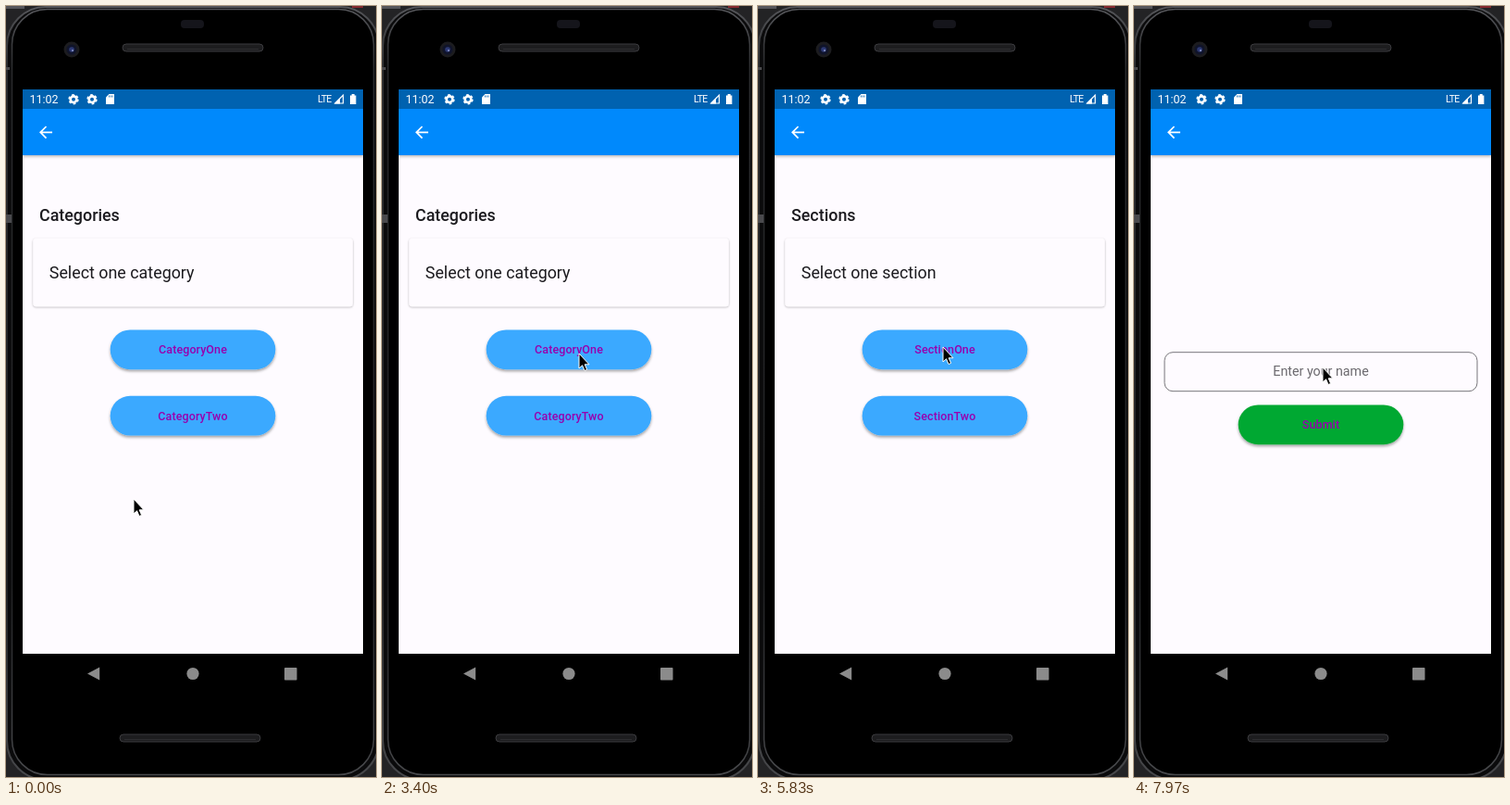
An HTML page for the animation above (8000 ms loop, 400 px wide and 832 px high).

```html
<!DOCTYPE html>
<html lang="en">
<head>
<meta charset="utf-8">
<style>
  html, body { margin: 0; width: 100%; height: 100%; overflow: hidden; background: #050505; }
  svg { display: block; width: 400px; height: 832px; font-family: Roboto, sans-serif; }
  .title { font-size: 17.86px; font-weight: 500; fill: #1c1b1f; }
  .body { font-size: 17.86px; fill: #1c1b1f; }
  .label { font-size: 12.5px; font-weight: 500; letter-spacing: .09px; fill: #9800ae; text-anchor: middle; }
  .hint { font-size: 14.29px; fill: #6b696e; text-anchor: middle; }
</style>
</head>
<body>
<svg viewBox="0 0 400 832">
  <defs>
    <linearGradient id="bezel" x1="0" y1="0" x2="0" y2="1">
      <stop offset="0" stop-color="#55565a"/>
      <stop offset=".08" stop-color="#292a2c"/>
      <stop offset=".75" stop-color="#202123"/>
      <stop offset="1" stop-color="#48494c"/>
    </linearGradient>
    <filter id="barShadow" x="-5%" y="-20%" width="110%" height="150%">
      <feDropShadow dx="0" dy="1.5" stdDeviation="1.5" flood-opacity=".28"/>
    </filter>
    <filter id="buttonShadow" x="-10%" y="-20%" width="120%" height="160%">
      <feDropShadow dx="0" dy="2" stdDeviation="1.8" flood-opacity=".36"/>
    </filter>
    <filter id="cardShadow" x="-5%" y="-10%" width="110%" height="125%">
      <feDropShadow dx="0" dy=".8" stdDeviation=".8" flood-opacity=".3"/>
    </filter>
    <clipPath id="screen"><rect x="18" y="90" width="368" height="609"/></clipPath>
    <g id="gear" fill="none" stroke="#fff">
      <circle r="3.3" stroke-width="2.6"/>
      <circle r="4.8" stroke-width="1.8" stroke-dasharray="2.6 2.427"/>
    </g>
    <g id="speaker">
      <rect width="152" height="8" rx="4" fill="#1d1d1f" stroke="#3b3b3e"/>
      <path d="M5 5.5H147" stroke="#2d2d30"/>
    </g>
  </defs>

  <!-- phone body -->
  <rect width="400" height="832" fill="#232325"/>
  <path d="M0 0H20V3H0Z" fill="#55555a"/>
  <path d="M374 0H386V2H374Z" fill="#85292f"/>
  <rect x="1" y="1" width="402" height="834" rx="42" fill="#0b0b0c" stroke="url(#bezel)" stroke-width="2"/>
  <rect x="6.5" y="3.5" width="391" height="826" rx="38" fill="#000" stroke="url(#bezel)" stroke-width="1.5"/>
  <path d="M0 66H4V69H0ZM0 225H6V234H0Z" fill="#4a4a4d"/>
  <rect x="189" y="15" width="25" height="9" rx="4" fill="#15151b"/>
  <use href="#speaker" x="126" y="41"/>
  <use href="#speaker" x="123" y="786"/>
  <circle cx="71" cy="47" r="8.5" fill="#1c1c1f"/>
  <circle cx="71" cy="47" r="5.5" fill="#10142a"/>
  <circle cx="71" cy="47" r="2.8" fill="#2d3973"/>
  <circle cx="72" cy="48" r="1" fill="#8d98cc"/>

  <g clip-path="url(#screen)">
    <rect x="18" y="90" width="368" height="609" fill="#fefbff"/>
    <rect x="18" y="111" width="368" height="50" fill="#0089fc" filter="url(#barShadow)"/>
    <rect x="18" y="90" width="368" height="21" fill="#0062b0"/>
    <g id="page"></g>
  </g>

  <!-- status and app bar icons -->
  <g fill="#fff">
    <text x="25.5" y="105.3" font-size="12.5">11:02</text>
    <use href="#gear" x="73" y="100.7"/>
    <use href="#gear" x="93" y="100.7"/>
    <path d="M111.5 95H117V106H108V98.5Z"/>
    <path d="M111.5 96.5V98.5M113.3 96.5V98.5M115.1 96.5V98.5" stroke="#0062b0" stroke-width=".8"/>
    <text x="337" y="104" font-size="10.5" letter-spacing="-.6">LTE</text>
    <path d="M355.8 105H364.5V96.3Z" fill="none" stroke="#fff" stroke-width="1.2"/>
    <path d="M355 105.5H361V99.5Z"/>
    <path d="M372 96.5H373.7V95H376.7V96.5H378.4V106H372Z"/>
  </g>
  <path d="M50 136.3H37.5M43.5 130L37.2 136.3L43.5 142.6" fill="none" stroke="#fff" stroke-width="1.7"/>

  <!-- navigation bar -->
  <g fill="#8b8b8b">
    <path d="M88 720.5L101.2 713.5V727.5Z"/>
    <circle cx="202" cy="720.5" r="6.6"/>
    <rect x="301" y="714" width="13.5" height="13.5" rx=".8"/>
  </g>

  <path id="cursor" d="M0 0V16L3.6 12.8L6 18.5L8.6 17.4L6.2 11.8H11Z" stroke="#fff" stroke-width="1"/>
</svg>
<script>
const LOOP = 8000;
const page = document.getElementById('page');
const cursor = document.getElementById('cursor');

const button = (text, y, fill) => `
  <rect x="112.7" y="${y}" width="178.6" height="42.8" rx="21.4" fill="${fill}" filter="url(#buttonShadow)"/>
  <text class="label" x="202" y="${y + 25.8}">${text}</text>`;

const chooser = (title, noun, name) => `
  <text class="title" x="36" y="231.6">${title}</text>
  <rect x="29.3" y="250.7" width="345.6" height="73.5" rx="3.5" fill="#fefbff" filter="url(#cardShadow)"/>
  <text class="body" x="46.8" y="294.2">Select one ${noun}</text>
  ${button(name + 'One', 349.4, '#3ba9ff')}
  ${button(name + 'Two', 420.8, '#3ba9ff')}`;

const form = `
  <rect x="33" y="373.7" width="338" height="42" rx="9" fill="none" stroke="#77757a"/>
  <text class="hint" x="202" y="398.8">Enter your name</text>
  ${button('Submit', 430.4, '#00a833')}`;

// [start time, markup]
const pages = [
  [0, chooser('Categories', 'category', 'Category')],
  [3800, chooser('Sections', 'section', 'Section')],
  [6900, form],
];

// [time, x, y] of the pointer tip
const stops = [
  [0, 138, 532], [150, 138, 532], [760, 213, 374], [2600, 213, 374],
  [3200, 213, 375], [4350, 213, 375], [4900, 194, 368], [5400, 194, 368],
  [5800, 200, 368], [7000, 200, 368], [7290, 200, 385], [7400, 200, 385],
  [7900, 204, 390], [LOOP, 204, 390],
];

function pointerAt(t) {
  const i = stops.findIndex(stop => stop[0] > t);
  const [t0, x0, y0] = stops[i - 1], [t1, x1, y1] = stops[i];
  const u = (t - t0) / (t1 - t0), eased = u * u * (3 - 2 * u);
  return [x0 + (x1 - x0) * eased, y0 + (y1 - y0) * eased];
}

let shown;
function draw(now) {
  const t = now % LOOP;
  const current = pages.findLast(([start]) => start <= t);
  if (current !== shown) {
    page.innerHTML = current[1];
    shown = current;
  }
  cursor.setAttribute('transform', `translate(${pointerAt(t)})`);
}

const began = performance.now();
function tick() {
  draw(performance.now() - began);
  requestAnimationFrame(tick);
}
tick();
</script>
</body>
</html>
```
